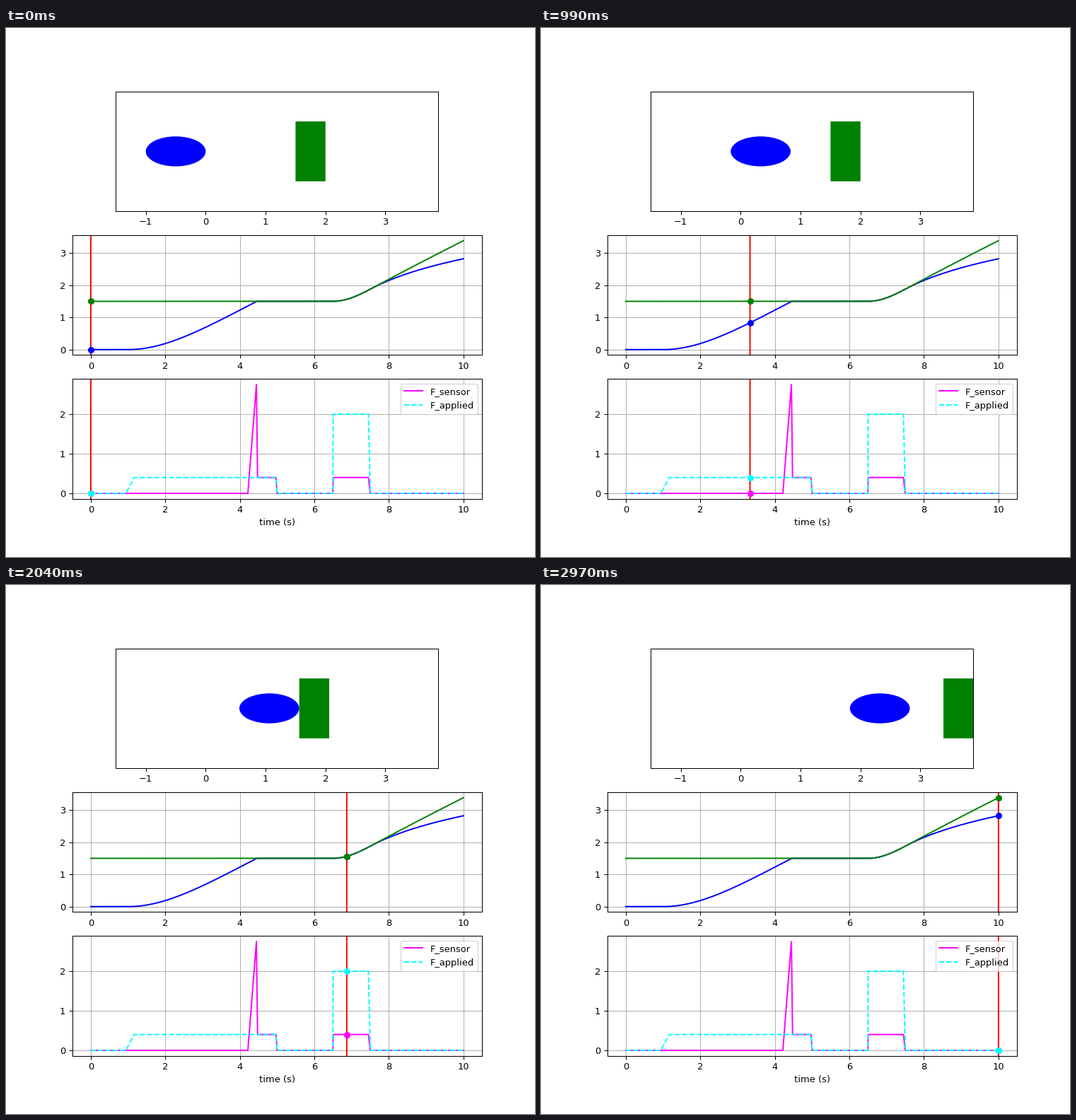
A matplotlib script for the animation above (3000 ms loop, 748 by 748 pixels).

```python
import numpy as np
import matplotlib.pyplot as plt
from matplotlib.animation import FuncAnimation
from matplotlib.patches import Ellipse, Rectangle

FRAMES, DURATION = 100, 10.0
WALL = 1.5                           # resting place of the block
PUSH_START, PUSH_END = 6.5, 7.5
PUSH_RATE, PUSH_DRAG = 1.33, 1.859
EXIT_SPEED = PUSH_RATE * np.tanh(PUSH_RATE) / PUSH_DRAG
BALL_DRAG, BLOCK_DRAG = 0.98, 0.042
SOFT, HARD, IMPACT = 0.4, 2.0, 2.75  # force levels


def driven(t, rate, drag):
    """Travel from rest under constant force and quadratic drag."""
    return np.log(np.cosh(rate * np.maximum(t, 0))) / drag


def coasting(t, drag):
    """Travel after release, slowed by quadratic drag."""
    return np.log1p(drag * EXIT_SPEED * np.maximum(t, 0)) / drag


def pushed(t):
    span = np.minimum(t, PUSH_END) - PUSH_START
    return driven(span, PUSH_RATE, PUSH_DRAG)


def ball_pos(t):
    approach = np.minimum(driven(t - 1, np.sqrt(SOFT), 1.0), WALL)
    return approach + pushed(t) + coasting(t - PUSH_END, BALL_DRAG)


def block_pos(t):
    return WALL + pushed(t) + coasting(t - PUSH_END, BLOCK_DRAG)


def pulse(t, start, end, rise, fall, height):
    """Trapezoid that climbs after start and is back at zero by end."""
    return height * np.clip(np.minimum((t - start) / rise, (end - t) / fall), 0, 1)


def push_force(t, height):
    return pulse(t, PUSH_START - 0.005, PUSH_END, 0.01, 0.05, height)


def applied(t):
    return pulse(t, 0.94, 5.0, 0.225, 0.03, SOFT) + push_force(t, HARD)


def sensor(t):
    hit = pulse(t, 4.215, 4.475, 0.23, 0.03, IMPACT)
    hold = pulse(t, 4.445, 5.0, 0.03, 0.03, SOFT)
    return hit + hold + push_force(t, SOFT)


fig, (scene, pos_ax, force_ax) = plt.subplots(3, 1, figsize=(8, 8), dpi=93.5)
fig.subplots_adjust(left=0.125, right=0.9, bottom=0.11, top=0.88, hspace=0.2)

times = np.linspace(0, DURATION, 2001)
reach = block_pos(DURATION)

scene.set_aspect("equal")
scene.set_xlim(-1.5, reach + 0.5)
scene.set_ylim(-1, 1)
scene.set_yticks([])
ball = scene.add_patch(Ellipse((-0.5, 0), 1, 0.5, color="blue", lw=0))
block = scene.add_patch(Rectangle((WALL, -0.5), 0.5, 1, color="green", lw=0, snap=False))

force_ax.set_xlabel("time (s)")
for ax, top in ((pos_ax, reach), (force_ax, IMPACT)):
    ax.grid(True)
    ax.set_xlim(-0.05 * DURATION, 1.05 * DURATION)
    ax.set_ylim(-0.05 * top, 1.05 * top)

curves = [
    (pos_ax, ball_pos, "blue", "-", None),
    (pos_ax, block_pos, "green", "-", None),
    (force_ax, sensor, "magenta", "-", "F_sensor"),
    (force_ax, applied, "cyan", "--", "F_applied"),
]
for ax, value, color, style, label in curves:
    ax.plot(times, value(times), style, color=color, label=label)
force_ax.legend(loc="upper right")

cursors = [ax.axvline(0, color="red", snap=False) for ax in (pos_ax, force_ax)]
dots = [(ax.plot([], [], "o", color=color)[0], value)
        for ax, value, color, _, _ in curves]


def update(i):
    t = DURATION * i / (FRAMES - 1)
    ball.set_center((ball_pos(t) - 0.5, 0))
    block.set_x(block_pos(t))
    for cursor in cursors:
        cursor.set_xdata([t, t])
    for dot, value in dots:
        dot.set_data([t], [value(t)])
    return [ball, block, *cursors, *(dot for dot, _ in dots)]


anim = FuncAnimation(fig, update, frames=FRAMES, interval=30,
                     init_func=lambda: update(0), repeat=True, repeat_delay=0)
plt.show()
```
